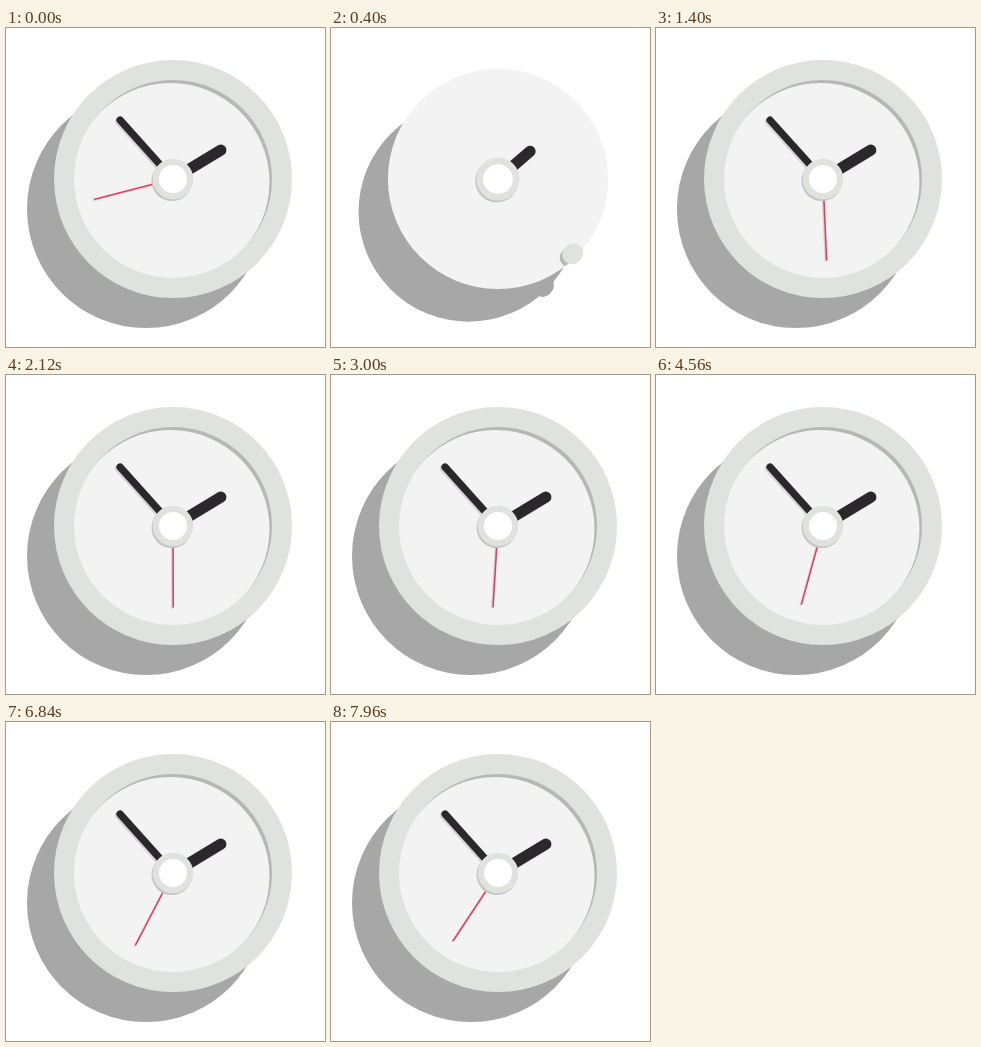
An HTML page with a canvas for the animation above (8 s loop, 319x319 px).

```html
<!DOCTYPE html>
<html lang="en">
<head>
<meta charset="utf-8">
<title>Clock</title>
<style>
  html, body { margin: 0; height: 100%; overflow: hidden; background: #fff; }
  canvas { display: block; width: 100vw; height: 100vh; }
</style>
</head>
<body>
<canvas></canvas>
<script>
const STAGE = 319, LOOP = 8000, CX = 167, CY = 151;
const FACE_R = 109, RING_R = 109, RING_W = 20;
const COLORS = {
  face: '#f3f3f3', ring: '#e0e2dd', cast: '#a7a7a7', inset: '#b7b8b3',
  hand: '#2a282a', second: '#e5405c', soft: 'rgba(0,0,0,.13)'
};
const HANDS = [
  { angle: -31.1, length: 56, width: 11, start: 300, swing: 40, color: COLORS.hand },
  { angle: 228.1, length: 79.3, width: 7.2, start: 375, swing: 120, color: COLORS.hand }
];

const canvas = document.querySelector('canvas');
const ctx = canvas.getContext('2d');
const rad = degrees => degrees * Math.PI / 180;

// Damped spring from 0 to 1; elapsed time in ms.
function spring(elapsed, damping = 6, frequency = 11) {
  if (elapsed <= 0) return 0;
  const s = elapsed / 1000;
  return 1 - Math.exp(-damping * s) * Math.cos(frequency * s);
}

function smooth(p) {
  p = Math.min(1, Math.max(0, p));
  return p * p * (3 - 2 * p);
}

function disc(x, y, r, color) {
  ctx.fillStyle = color;
  ctx.beginPath();
  ctx.arc(x, y, Math.max(0, r), 0, 2 * Math.PI);
  ctx.fill();
}

// The ring opens both ways from its lower right side.
function ring(x, y, { scale, sweep }, color) {
  if (sweep <= 0) return;
  const half = Math.PI * sweep, middle = Math.PI / 4;
  ctx.strokeStyle = color;
  ctx.lineWidth = RING_W * scale;
  ctx.beginPath();
  ctx.arc(x, y, RING_R * scale, middle - half, middle + half);
  ctx.stroke();
}

function hand(angle, length, width, color, offset) {
  if (length <= 0) return;
  const dx = Math.cos(rad(angle)) * length, dy = Math.sin(rad(angle)) * length;
  ctx.lineWidth = width;
  for (const [shift, paint] of [[offset, COLORS.soft], [0, color]]) {
    ctx.strokeStyle = paint;
    ctx.beginPath();
    ctx.moveTo(CX - shift, CY + shift);
    ctx.lineTo(CX - shift + dx, CY + shift + dy);
    ctx.stroke();
  }
}

function secondAngle(t) {
  if (t < 40) return 165.5;
  const tick = Math.floor((t - 80) / 1000);
  if (tick < 1) return 81.5;
  return 81.5 + 6 * (tick - 1 + spring(t - 80 - tick * 1000, 7, 15));
}

function draw(t) {
  // The loop opens on the resting clock, then the build-up starts.
  const intro = t < 40 ? 1e5 : t;
  const faceR = FACE_R * spring(intro - 40, 10, 12);
  const lift = spring(intro - 40, 4, 12);
  const shadowX = CX - 27 * lift, shadowY = CY + 30 * lift;
  const rim = {
    scale: 0.97 + 0.03 * spring(intro - 700),
    sweep: smooth((intro - 380) / 600)
  };

  ctx.fillStyle = '#fff';
  ctx.fillRect(0, 0, STAGE, STAGE);
  ctx.lineCap = 'round';

  disc(shadowX, shadowY, faceR, COLORS.cast);
  ring(shadowX, shadowY, rim, COLORS.cast);
  disc(CX, CY, faceR, COLORS.face);

  ctx.save();
  ctx.beginPath();
  ctx.arc(CX, CY, Math.max(0, faceR), 0, 2 * Math.PI);
  ctx.clip();
  ring(CX - 2.5, CY + 3, rim, COLORS.inset);
  ctx.restore();
  ring(CX, CY, rim, COLORS.ring);

  for (const { angle, length, width, start, swing, color } of HANDS) {
    const grow = spring(intro - start);
    hand(angle + swing * (grow - 1), length * grow, width, color, 1.5);
  }
  hand(secondAngle(t), 81 * spring(intro - 375), 1.6, COLORS.second, 1.2);

  const hub = spring(intro - 250, 9, 12);
  disc(CX - 1.2 * hub, CY + 1.8 * hub, 20.3 * hub, '#c6c7c2');
  disc(CX, CY, 20.3 * hub, COLORS.ring);
  disc(CX, CY, 14 * hub, '#fff');
}

function resize() {
  const density = window.devicePixelRatio || 1;
  canvas.width = Math.round(innerWidth * density);
  canvas.height = Math.round(innerHeight * density);
  ctx.setTransform(canvas.width / STAGE, 0, 0, canvas.height / STAGE, 0, 0);
}

const begin = performance.now();
function frame() {
  draw((performance.now() - begin) % LOOP);
  requestAnimationFrame(frame);
}
addEventListener('resize', resize);
resize();
frame();
</script>
</body>
</html>
```
